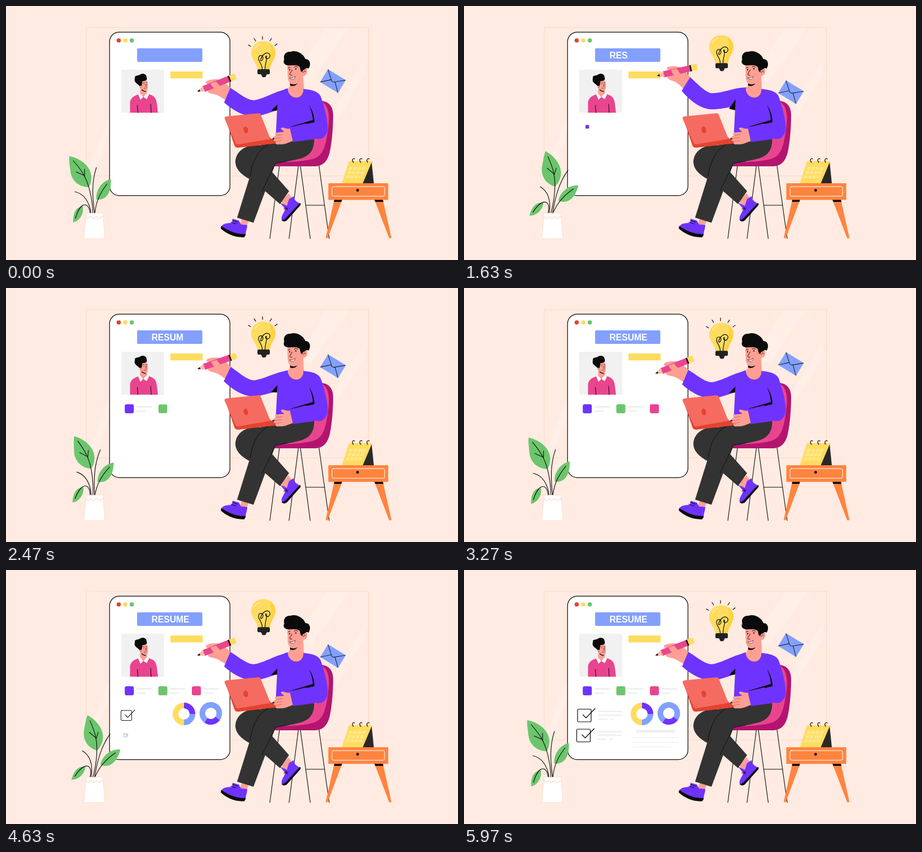
Recreate the animation shown at these times as an HTML page with a canvas. Size 800 by 450 pixels, loop 6000 ms.

```html
<!DOCTYPE html>
<html lang="en">
<head>
<meta charset="utf-8">
<title>Resume builder</title>
<style>
html, body { margin: 0; width: 100%; height: 100%; overflow: hidden; background: #ffebe1; }
canvas { display: block; width: 800px; height: 450px; }
</style>
</head>
<body>
<canvas id="stage" width="800" height="450"></canvas>
<script>
const c = document.getElementById('stage').getContext('2d');
const LOOP = 6000, SWING = 3000, TAU = Math.PI * 2;
const INK = '#0b0b0b', SKIN = '#ff9f93', PURPLE = '#6f33ff', PINK = '#e9458f',
  WINE = '#b3146f', BLUE = '#83a0ff', YELLOW = '#ffdc5f', GREEN = '#6cc56d',
  RED = '#e5432f', PANTS = '#333', ORANGE = '#ff843f', PALE = '#efefef', PEACH = '#fbd6c6';

const clamp = v => Math.min(1, Math.max(0, v));
const ramp = (t, start, len) => clamp((t - start) / len);
const smooth = v => v * v * (3 - 2 * v);
const easeOut = v => 1 - (1 - v) * (1 - v);
const wave = t => (1 - Math.cos(t / SWING * TAU)) / 2;

const shapes = {};
const shape = d => shapes[d] || (shapes[d] = new Path2D(d));

function fill(d, color) {
  c.fillStyle = color;
  c.fill(shape(d));
}
function line(d, width = 1.1, color = INK) {
  c.strokeStyle = color;
  c.lineWidth = width;
  c.stroke(shape(d));
}
function box(x, y, w, h, r, color, stroke, width = 1.1) {
  c.beginPath();
  c.roundRect(x, y, w, h, r);
  if (color) { c.fillStyle = color; c.fill(); }
  if (stroke) { c.strokeStyle = stroke; c.lineWidth = width; c.stroke(); }
}
function dot(x, y, r, color, ry = r, turn = 0) {
  c.beginPath();
  c.ellipse(x, y, r, ry, turn, 0, TAU);
  c.fillStyle = color;
  c.fill();
}
function at(x, y, angle, scale, draw) {
  c.save();
  c.translate(x, y);
  c.rotate(angle);
  c.scale(scale, scale);
  draw();
  c.restore();
}
function turn(x, y, degrees, draw) {
  c.save();
  c.translate(x, y);
  c.rotate(degrees * Math.PI / 180);
  c.translate(-x, -y);
  draw();
  c.restore();
}

function backdrop() {
  c.fillStyle = '#ffebe1';
  c.fillRect(0, 0, 800, 450);
  c.strokeStyle = PEACH;
  c.lineWidth = 0.9;
  c.strokeRect(142.5, 38, 499, 263);
  const glass = 'rgba(255,255,255,.17)';
  fill('M567 39H607L540 134L510 128Z', glass);
  fill('M635 95V122L567 232L553 228Z', glass);
  fill('M183 195V228L160 285L145 290Z', glass);
}

function portrait() {
  box(204, 113, 76, 76, 0, '#f1f1f1');
  fill('M219.5 189V174C219 165 223 160 236 156H251C261 158 266 162 267 173L269 189Z', PINK);
  line('M232.500 176L233.500 189M256 174L257 189', 1);
  fill('M238 143L249 148L250 156C247 162 240 160 237 156Z', SKIN);
  fill('M236 154L243 161L238 166L234 157ZM250 154L243 161L249 165L253 157Z', '#fff');
  fill('M239 132H249C252 137 252 146 249.500 150C245 152 240 149 238 144Z', SKIN);
  line('M240.500 148.500Q243.500 151.500 247 151.500', 1.3);
  fill('M238.500 146C236 139 231 138 229 135C226 131 229 128 228 125.500C230 122.500 234 124 238 121C243 118.500 249 121 249 127C251 131.500 246 133 241.500 133L240.500 139L239.500 142Z', INK);
  dot(237.6, 143, 1.8, SKIN);
  dot(244, 138.5, 0.6, INK);
  dot(249, 138, 0.6, INK);
  line('M242.500 136H245M248 135.500H250M247 138L248.500 142H246.500M244.500 145.500Q247 147 248.500 144.500', 0.6);
}

function heading(t) {
  c.font = 'bold 15.7px "Liberation Sans", Arial, sans-serif';
  c.fillStyle = '#fff';
  let x = 257.4;
  [...'RESUME'].forEach((ch, i) => {
    const s = smooth(ramp(t, 200 + i * 450, 350));
    if (s > 0) at(x, 93, 0, s, () => c.fillText(ch, 0, 0));
    x += c.measureText(ch).width;
  });
}

function skills(t) {
  [PURPLE, GREEN, PINK].forEach((color, i) => {
    const s = easeOut(ramp(t, 1560 + i * 650, 320));
    const x = 218.2 + i * 59.4;
    if (s) at(x, 214, 0, s, () => box(-8, -8, 16, 16, 3.2, color));
    const w = smooth(ramp(t, 2000 + i * 650, 400));
    c.fillStyle = PALE;
    c.fillRect(x + 13, 209, 27 * w, 3);
    c.fillRect(x + 13, 216.700, 16 * w, 3);
  });
}

function donut(x, y, t, slices) {
  const s = smooth(ramp(t, 3700, 700));
  if (!s) return;
  c.lineCap = 'butt';
  at(x, y, (s - 1) * TAU, s, () => {
    for (const [from, to, color] of slices) {
      c.beginPath();
      c.arc(0, 0, 15, from * TAU / 360, to * TAU / 360);
      c.strokeStyle = color;
      c.lineWidth = 10;
      c.stroke();
    }
  });
  c.lineCap = 'round';
}

function checkRow(x, y, t, start) {
  const s = smooth(ramp(t, start, 400));
  if (s) at(x + 12, y + 11, 0, s, () => {
    box(-12, -11, 24, 22.5, 1.8, null, INK, 1.2);
    line('M-2.500 -1L3 4.500L19 -12', 1.3);
  });
  const w = smooth(ramp(t, 4900, 550));
  c.fillStyle = PALE;
  c.fillRect(x + 36, y + 3, 44 * w, 2.5);
  c.fillRect(x + 36, y + 9.5, 44 * w, 2.5);
  c.fillRect(x + 36, y + 16.5, 17 * w, 2.5);
  c.fillRect(x + 57.5, y + 16.5, 6 * w, 2.5);
}

function page(t) {
  box(183.3, 46.3, 213.1, 289.6, 17, '#fff', INK, 1.2);
  [RED, '#ffd968', GREEN].forEach((color, i) => dot(199.5 + i * 11.6, 61, 3.8, color));
  box(232, 75, 115.500, 24, 2, BLUE);
  heading(t);
  portrait();
  box(291, 116, 57, 12.3, 0, YELLOW);
  skills(t);
  donut(315, 255, t, [[90, 270, YELLOW], [-90, 0, PURPLE], [0, 90, BLUE]]);
  donut(362.5, 254, t, [[125, 396, BLUE], [36, 125, PURPLE]]);
  checkRow(201, 246.500, t, 4350);
  checkRow(199.5, 282, t, 4500);
  const w = smooth(ramp(t, 5350, 500));
  c.fillStyle = PALE;
  c.fillRect(305, 283, 69 * w, 5);
  [296.5, 304.5, 312.5].forEach((y, i) => c.fillRect(299, y, (i < 2 ? 81 : 68) * w, 1.2));
}

function bulb(t) {
  const p = t % SWING;
  const glow = p < 1500 ? 1 - ramp(p, 850, 400) : ramp(p, 1700, 550);
  c.save();
  c.translate(0, -11 * wave(t));
  c.globalAlpha = glow;
  line('M429 69L433 71.500M439 57.500L442 62M454 54V59M470 57.500L467 62M480 67L476 70', 1.2);
  c.globalAlpha = 1;
  fill('M434 84C434 71 443 62.500 455 62.500C468 62.500 477 71 477 83C477 95 467 101 467 113H445C444 101 434 95 434 84Z', YELLOW);
  fill('M467 66C473 70 477 76 477 83C477 95 467 101 467 113H460C461 100 473 92 467 66Z', '#fdd243');
  line('M440 76C442 72 445 69 449 68', 1.3, '#ffeeab');
  line('M453.500 113C454 103 447 99 447 93C447 86 455 86 455 92C454 98 449 98 451 94C453 87 460 81 465 84C470 88 465 95 461 93C458 91 460 87 461 89C463 95 458 102 458.500 113', 1.2);
  box(445, 112, 22, 9, 2.5, '#222');
  fill('M451 120H462L459.500 125.500Q456 127 453.500 125.500Z', '#222');
  c.restore();
}

function envelope(t) {
  at(578.7, 133 + 20 * wave(t), 0.55, 1, () => {
    box(-18.5, -13.3, 37, 26.6, 1, BLUE);
    line('M-18 -12.800L-2 1Q0 2 2 1L18 -12.800M-18 12.800L-4 -0.500M18 12.800L4 -0.500', 0.9);
  });
}

function plant(t) {
  turn(157, 367, 17.8 * wave(t), () => {
    fill('M112 266C133 270 151 285 151 303C151 312 149 318 146 321C130 321 116 310 114 293C113 283 111 273 112 266Z', GREEN);
    fill('M185.500 306.500C187 326 180 345 160 343C158 330 167 311 185.500 306.500Z', GREEN);
    fill('M119 383.500C118 367 124 355 136 355C138 368 131 380 119 383.500Z', GREEN);
    line('M154 369C153 340 146 314 138 300C133 290 126 282 119 274');
    line('M139 302V289M138 300L124 294');
    line('M157 369C159 348 165 333 179 315');
    line('M149 369C148 347 132 344 123 376');
    line('M122 329C139 333 148 349 151 369');
    line('M160 286C151 313 153 340 157 369');
  });
  fill('M142 367H171.500L175 412H138Z', '#fff');
  line('M142 367H171.500L175 412H138Z', 0.7, PEACH);
  line('M142 373Q144 379 147 375Q150 371 152 375Q155 379 157 375Q160 371 162 375Q165 379 167 375Q169 372 172 374', 1, '#f8c5b1');
}

function chair() {
  line('M484 283L467 412M517.500 283L501 412M521 283L538.500 412M554 283L572 412M530.500 353H564', 1.1);
  fill('M556 168C570 168 579 177 579 193C579 215 577 240 573 259C569 275 561 284 547 284H478C473 284 470 281 470 277L540 250Z', WINE);
  fill('M556 168C571 174 574 193 570 218C566 247 562 264 546 270C532 275 500 277 480 277L470 270L540 240Z', PINK);
}

function table() {
  fill('M581 343H595L569.500 411Q568 413 566 410Z', ORANGE);
  fill('M652 343H667L682 410Q681 413 678 411Z', ORANGE);
  fill('M581 343H595L593.500 347H580.500ZM652 343H667L668 347H653.500Z', INK);
  box(570.5, 314, 106, 29.5, 1, ORANGE);
  box(577, 320, 93, 17, 2.5, null, '#fff', 1);
  dot(622.3, 326.5, 2.4, INK);
  fill('M647 275L651 314H630Z', '#292929');
  fill('M607 275H648L631.500 314H594.500Z', YELLOW);
  for (let row = 0; row < 3; row++) {
    for (let col = 0; col < 4; col++) {
      const x = 608.5 + col * 7.5 - row * 2.8, y = 285 + row * 7.5;
      c.beginPath();
      c.moveTo(x, y);
      c.lineTo(x + 6, y);
      c.lineTo(x + 4, y + 5.5);
      c.lineTo(x - 2, y + 5.5);
      c.fillStyle = '#ffe88a';
      c.fill();
    }
  }
  line('M615 277C611 273 614 269 617 271M628 277C624 273 627 269 630 271M640 277C637 273 640 269 643 271', 1.2);
}

function legs() {
  fill('M488 345L500 332L508 343L492 360Z', SKIN);
  fill('M484.500 348L497 354L501 342L509 337C510 344 515 348 521 350L495 381L488 379C486 371 494 365 494 359Z', PURPLE);
  fill('M520 349Q522.500 350 521 353L497 380Q491 384 487.500 379Q492 379 495 376Z', INK);
  line('M492 360L499 358M495 356L498 362', 1);
  fill('M418 374L430 379L425 392L414 388Z', SKIN);
  fill('M401 377L412 380L416 387L427 388C427 395 424 399 424 407C409 411 392 402 381 393C382 384 393 385 400 384Z', PURPLE);
  fill('M381 389.500C394 399 409 405 424.500 404L422 409.500C406 411 389 403 380 394Z', INK);
  line('M398 383L407 386M401 380L410 383', 1);

  fill('M476 232L450 247C424 244 406 258 406 277C407 293 423 303 438 310L485 351L501 328L462 284L500 270Z', PANTS);
  fill('M476 230H545C547 249 542 264 522 270C503 275 489 277 477 279L438 384L409 375L432 301C437 272 446 255 465 243Z', PANTS);
  line('M432 301C437 272 446 255 466 244', 0.9);
  line('M453 328L477 279C485 277 490 276 497 275', 0.8);
}

function pencil() {
  at(338.500, 151.500, -0.378, 1, () => {
    fill('M0 0L13 -5.500V5.500Z', '#ffb9aa');
    fill('M0 0L5 -2.100V2.100Z', INK);
    fill('M12 -5.500H62V5.500H12Q14 3 12 0Q14 -3 12 -5.500Z', PINK);
    fill('M60 -5.500H63V5.500H60Z', INK);
    fill('M62.500 -5.500H71Q73 -5 73 -3V4Q73 5.500 71 5.500H62.500Z', YELLOW);
  });
}

function arm(t) {
  const lift = t < SWING ? wave(t) : 0;
  turn(518, 156, 9.1 * lift, () => {
    fill('M399 146C391 140 384 131 376 130C368 129 357 131 354 134C353 138 357 139 362 139L357 151C358 154 362 155 367 156C374 157 380 161 389 167Z', SKIN);
    pencil();
    fill('M362 137C364 143 370 149 378 151L386 147C379 143 375 138 372 134Z', SKIN);
    fill('M500 147C479 149 457 165 438 167C425 166 412 154 397 145L386 171C401 184 420 196 440 195.500C455 194 468 188 483 184L508 174Z', PURPLE);
  });
  c.beginPath();
  c.moveTo(469, 186 - 4 * lift);
  c.lineTo(483, 172 - 10 * lift);
  c.lineTo(481, 185);
  c.fillStyle = INK;
  c.fill();
}

function torso() {
  fill('M498 146C490 148 484 152 481 159L480 180L477.500 229C493 239 520 239 545 234C557 239 567 233 569 220C571 208 565 184 558 163C555 152 545 149 527 147Z', PURPLE);
  fill('M502 130L526 122L527 147C527 168 501 168 498 147L502 143Z', SKIN);
  fill('M503 137C508 140 512 139 516 137C513 141 508 143 503 141Z', INK);
  line('M498 147C501 168 527 168 527 147', 0.6, '#4b1fc4');
  fill('M536 175C542 184 546 194 546 206C538 207 518 214 503 214L543 202C543 193 540 184 536 175Z', INK);
}

function head() {
  fill('M498 102L525 100L533 112C534 119 531 124 526 124C523 132 515 138 507 138.500C501 138 498.500 131 498.500 123Z', SKIN);
  fill('M498 105C492 104 490 99 492.500 95C490 86 496 80 504 81C511 78 525 82 530 94C539 94 540 105 535.500 111C533 109 529 110 528 116L526 119L521.500 115L520 108C515 103 505 106 498 105Z', INK);
  dot(528.5, 117, 4, SKIN, 4.800, 0.3);
  line('M526.500 118C527 114 531 114 530 117', 0.7);
  dot(502, 113, 0.9, INK, 1.4);
  dot(513, 111.5, 0.9, INK, 1.4);
  line('M499 110Q501 107.500 503 109M510 108Q513 106 516 108', 0.9);
  line('M506.500 113L502 121Q502.500 123 506 122.500', 0.9);
  fill('M502 127.500Q507 128.500 512 124.500Q511 130 507 130Q504 130 502 127.500Z', '#fff');
  line('M502 127.500Q507 128.500 512 124.500Q511 130 507 130Q504 130 502 127.500Z', 0.6);
}

function laptop() {
  fill('M388 199L409 240L466 231L470 236H479L482 243L411 251Q405 251 404 246Z', RED);
  fill('M391 195.500L447 190Q450 190 451 193L468 235.500L412 245Q408 246 406 242L387 200Q386 196 391 195.500Z', '#f66b61');
  dot(424.5, 219.500, 4, RED, 6, -0.25);
  fill('M503 217C497 219 491 214 487 216C485 219 492 221 492 223L479 224C475 225 475 228 480 229C473 230 472 234 476 235C472 237 474 240 478 240C475 244 479 246 484 245C493 246 500 242 508 239Z', SKIN);
  line('M480 229L489 228M476 235L488 233M478 240L488 238', 0.8, '#c9645f');
  fill('M502 215L531 208L555 222L545 236L508 241Z', PURPLE);
}

function draw(now) {
  const t = now % LOOP;
  c.lineCap = 'round';
  c.lineJoin = 'round';
  backdrop();
  page(t);
  plant(t);
  bulb(t);
  chair();
  envelope(t);
  table();
  legs();
  arm(t);
  torso();
  head();
  laptop();
}

function tick() {
  draw(performance.now());
  requestAnimationFrame(tick);
}
tick();
</script>
</body>
</html>
```
